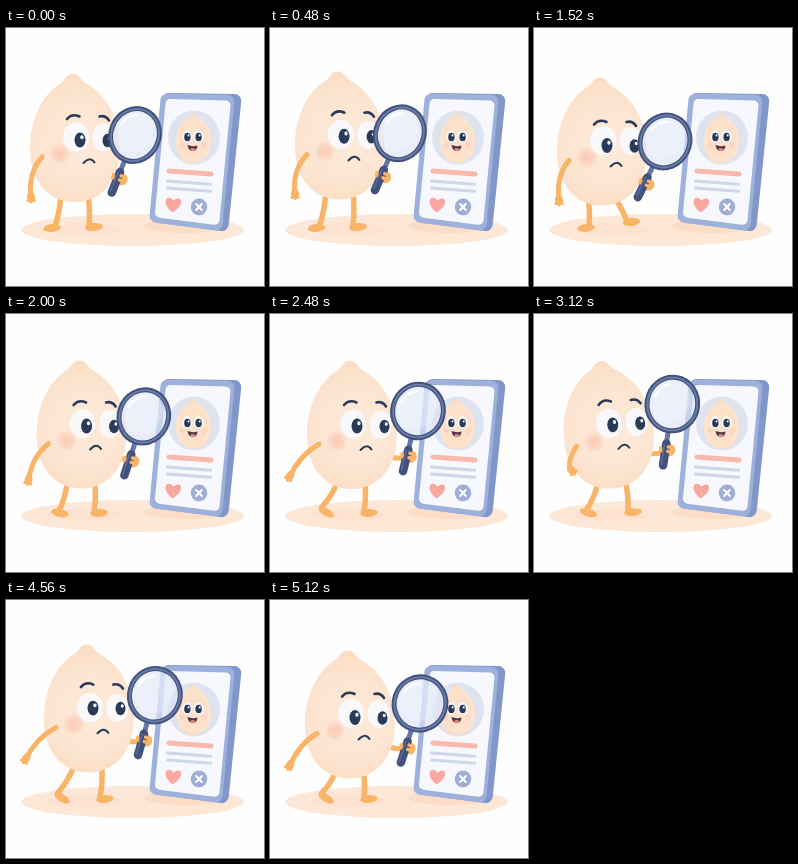
An HTML page with a canvas that plays this animation: 258x258 px, repeating every 5.2 s.

```html
<!DOCTYPE html>
<html lang="en">
<head>
<meta charset="utf-8">
<title>Curious seed</title>
<style>
html, body { margin: 0; width: 100%; height: 100%; overflow: hidden; background: #fefefe; }
canvas { display: block; width: 100vw; height: 100vh; }
</style>
</head>
<body>
<canvas id="stage"></canvas>
<script>
const SIZE = 258, LOOP = 5200, STEP = 80;
const canvas = document.getElementById('stage');
const c = canvas.getContext('2d');
const ORANGE = '#f9b467', NAVY = '#42527c', INK = '#2a3b57';

function ramp(t, from, to) {
  const u = Math.min(1, Math.max(0, (t - from) / (to - from)));
  return u * u * (3 - 2 * u);
}

function pulse(t, mid, half) {
  return ramp(t, mid - half, mid) - ramp(t, mid, mid + half);
}

// The seed steps up, leans in, ponders, then leans in again
function poseAt(t) {
  const ponderIn = ramp(t, 2840, 3500), ponderOut = ramp(t, 4040, 4560);
  const think = ponderIn - ponderOut;
  const lean = ramp(t, 1600, 2440) - think;
  const step = ramp(t, 400, 880);
  const stride = pulse(t, 1520, 480);
  const crouch = stride + pulse(t, 5120, 440);
  const hop = pulse(t, 600, 480) + pulse(t, 4640, 360);
  const swing = pulse(t, 2840, 360);
  return {
    body: {
      x: 69 + step + 12 * lean - 8 * think - 2 * crouch + hop,
      y: 112 + lean + 3.5 * crouch - 3 * hop,
      tilt: -11 * think
    },
    gaze: { x: 4 - think - hop, y: 3 - lean + 2 * crouch - 2 * think - 1.5 * hop },
    lens: {
      x: 129 + 19 * lean - 6 * think + 2 * crouch + hop,
      y: 107 - 10 * lean - 28 * think + 6.5 * crouch - 2 * hop,
      r: 26.2 + 1.3 * (lean + think) + crouch * 0.5,
      tilt: 22 - 8 * lean - 22 * think + 4 * crouch + 2 * hop
    },
    elbow: { x: 22 + 8 * lean + 13 * think - 2 * swing, y: 145 - 4 * lean + 18 * think + 2 * crouch - 3 * hop },
    hand: { x: 25 - 5 * lean + 42 * think - 4 * swing, y: 169 - 7 * lean - 22 * think + 3 * crouch - 4 * hop },
    left: { x: 46 + 6 * step + 4 * lean, y: 200 - 2 * lean, tilt: 0.65 * lean, heel: 3 - 7 * lean },
    right: { x: 88 + 11 * (lean + think) + 9.5 * stride, y: 199 - 2 * think - 5 * stride, tilt: 0, heel: -5 }
  };
}

function oval(x, y, rx, ry, fill, rot = 0) {
  c.beginPath();
  c.ellipse(x, y, rx, ry, rot, 0, Math.PI * 2);
  c.fillStyle = fill;
  c.fill();
}

function ring(rx, ry, width, color, from = 0, to = Math.PI * 2) {
  c.beginPath();
  c.ellipse(0, 0, rx, ry, 0, from, to);
  c.lineWidth = width;
  c.strokeStyle = color;
  c.stroke();
}

// Stroke between two points; an optional control point bends it
function line(x1, y1, x2, y2, width, color, cx = (x1 + x2) / 2, cy = (y1 + y2) / 2) {
  c.beginPath();
  c.moveTo(x1, y1);
  c.quadraticCurveTo(cx, cy, x2, y2);
  c.lineWidth = width;
  c.strokeStyle = color;
  c.stroke();
}

// Filled quad with rounded corners
function quad(points, radius, fill) {
  const n = points.length, last = points[n - 1], first = points[0];
  c.beginPath();
  c.moveTo((last[0] + first[0]) / 2, (last[1] + first[1]) / 2);
  points.forEach((p, i) => c.arcTo(...p, ...points[(i + 1) % n], radius));
  c.closePath();
  c.fillStyle = fill;
  c.fill();
}

function glow(x, y, r, alpha) {
  const g = c.createRadialGradient(x, y, 0, x, y, r);
  g.addColorStop(0, `rgba(250,180,158,${alpha})`);
  g.addColorStop(0.5, `rgba(250,180,158,${alpha * 0.7})`);
  g.addColorStop(1, 'rgba(250,180,158,0)');
  oval(x, y, r, r, g);
}

function seed() {
  c.beginPath();
  c.moveTo(-2, -66);
  c.bezierCurveTo(-9, -66, -9, -61, -14, -57);
  c.bezierCurveTo(-35, -44, -45, -18, -45, 8);
  c.bezierCurveTo(-45, 40, -28, 62, 0, 62);
  c.bezierCurveTo(28, 62, 45, 38, 45, 8);
  c.bezierCurveTo(45, -22, 31, -46, 10, -57);
  c.bezierCurveTo(5, -61, 4, -66, -2, -66);
  const g = c.createRadialGradient(8, 4, 12, 0, 0, 68);
  g.addColorStop(0, '#fde9d8');
  g.addColorStop(0.6, '#fce4d0');
  g.addColorStop(1, '#fbdcc2');
  c.fillStyle = g;
  c.fill();
}

function eye(x, y, rx, ry, px, py, size) {
  oval(x, y, rx, ry, '#f9f9fb');
  oval(x + px, y + py, size, size * 1.35, INK);
  oval(x + px + size * 0.35, y + py - size * 0.5, size * 0.3, size * 0.35, '#fff');
}

function ground() {
  oval(126.5, 202, 111.5, 16, '#fde8d8');
  oval(78, 201, 38, 6, '#fce2cf');
  oval(180, 198, 42, 7, '#fbddc8');
}

function avatar() {
  oval(188, 109.5, 26, 27, '#dfe2ef');
  c.save();
  c.translate(187.5, 111);
  c.scale(0.39, 0.39);
  seed();
  c.restore();
  oval(187.5, 111, 15, 18, 'rgba(251,216,184,.4)');
  for (const side of [-1, 1]) {
    glow(187 + side * 11, 117, 3.5, 0.35);
    eye(187 + side * 5.6, 108.5, 5, 6, 0, 0.5, 3.2);
  }
  c.beginPath();
  c.moveTo(181.5, 117);
  c.quadraticCurveTo(186.5, 119, 191.5, 117.5);
  c.quadraticCurveTo(191, 123, 186.5, 123);
  c.quadraticCurveTo(182, 122.5, 181.5, 117);
  c.fillStyle = '#55384a';
  c.fill();
  oval(186.8, 121.5, 2.6, 1.3, '#f0948a');
}

function phone() {
  quad([[156, 65], [236, 66], [222, 204], [145, 194]], 7, '#8197ca');
  quad([[155, 65.5], [229, 67], [216, 203], [143, 194]], 7, '#9db1dc');
  quad([[160, 71], [225, 72.5], [213, 197.5], [148.5, 189]], 5, '#f6f8fd');
  avatar();
  line(163, 143, 205, 146, 5, '#fbb9ae');
  for (const y of [153, 160]) line(161.5, y, 204.5, y + 3.3, 3, '#ced6ea');
  c.beginPath();
  c.moveTo(166.5, 184.5);
  c.bezierCurveTo(154, 175, 161, 165, 167.5, 172.5);
  c.bezierCurveTo(175, 166, 180.5, 176, 166.5, 184.5);
  c.fillStyle = '#f9a8a0';
  c.fill();
  oval(193, 179, 8.2, 8.5, '#a0aed5');
  line(190.2, 176, 195.8, 182, 2, '#fff');
  line(195.8, 176, 190.2, 182, 2, '#fff');
}

function face(gaze) {
  const lift = 3 - gaze.y;
  glow(-15, 14, 11, 0.55);
  eye(1, -3, 13, 14.5, gaze.x, gaze.y, 5.5);
  eye(28.5, -2.5, 11, 14, gaze.x, gaze.y, 5);
  line(-8, -21 - lift, 4.5, -23.5 - lift, 2.6, INK, -3, -27 - lift);
  line(24.5, -23.5 - lift, 34, -19.5 - lift, 2.6, INK, 30.5, -25 - lift);
  line(8.5, 23, 19.5, 22.5, 2, INK, 15, 16);
}

// Stage point at an offset inside a tilted part
function placed(part, dx, dy) {
  const a = part.tilt * Math.PI / 180;
  return [part.x + dx * Math.cos(a) - dy * Math.sin(a), part.y + dx * Math.sin(a) + dy * Math.cos(a)];
}

function inside(part, paint) {
  c.save();
  c.translate(part.x, part.y);
  c.rotate(part.tilt * Math.PI / 180);
  paint();
  c.restore();
}

function leg(body, hip, foot) {
  const [x, y] = placed(body, hip, 54);
  const ax = foot.x + foot.heel, ay = foot.y - 2 - 5 * foot.tilt;
  line(x, y, ax, ay, 5.5, ORANGE, (x + ax) / 2 + 2, (y + ay) / 2 + 2);
  oval(foot.x, foot.y, 8.8, 3.9, ORANGE, foot.tilt - 0.1);
}

function nearArm(body, elbow, hand) {
  const [sx, sy] = placed(body, -33, 17);
  line(sx, sy, hand.x, hand.y, 5, ORANGE, elbow.x, elbow.y);
  const a = Math.atan2(hand.y - elbow.y, hand.x - elbow.x);
  oval(hand.x, hand.y, 5.5, 4, ORANGE, a);
  for (const turn of [-0.6, 0.1, 0.8]) {
    line(hand.x, hand.y, hand.x + Math.cos(a + turn) * 5, hand.y + Math.sin(a + turn) * 5, 2.8, ORANGE);
  }
}

function farArm(body, lens) {
  const [sx, sy] = placed(body, 37, 30);
  const [hx, hy] = placed(lens, 3, 47);
  line(sx, sy, hx, hy, 5, ORANGE, (sx + hx) / 2, (sy + hy) / 2 + 2);
}

function magnifier(r) {
  const tall = 29;
  oval(4.5, 46, 5.5, 6, ORANGE);
  line(0, tall, 0, tall + 8, 5, '#6577a8');
  line(0, 40, 0, 62, 8.5, NAVY);
  line(-1.8, 41, -1.8, 61, 1.6, '#596b96');
  oval(0, 0, r - 2, tall - 2, 'rgba(221,229,248,.64)');
  oval(-2, -2, r - 8, tall - 8, 'rgba(240,244,254,.3)', 0.3);
  ring(r - 2.2, tall - 2.2, 5, NAVY);
  ring(r - 2.6, tall - 2.6, 1.8, '#6b7dab');
  ring(r - 9, tall - 9, 2.5, 'rgba(255,255,255,.85)', Math.PI * 1.08, Math.PI * 1.4);

  // Fingers wrapped round the handle
  for (const y of [43, 47.5]) line(2.5, y, 7, y, 3.5, ORANGE);
  line(-5, 45, -4.5, 48, 3.5, ORANGE);
}

function draw(t) {
  const { body, gaze, lens, elbow, hand, left, right } = poseAt(t);
  c.fillStyle = '#fefefe';
  c.fillRect(0, 0, SIZE, SIZE);
  ground();
  phone();
  leg(body, -14, left);
  leg(body, 13, right);
  farArm(body, lens);
  inside(body, () => { seed(); face(gaze); });
  nearArm(body, elbow, hand);
  inside(lens, () => magnifier(lens.r));
}

const ratio = window.devicePixelRatio || 1;
canvas.width = canvas.height = Math.round(SIZE * ratio);
c.scale(canvas.width / SIZE, canvas.height / SIZE);
c.lineCap = 'round';
c.lineJoin = 'round';

function tick() {
  const t = performance.now() % LOOP;
  draw(Math.floor(t / STEP) * STEP);
  requestAnimationFrame(tick);
}
tick();
</script>
</body>
</html>
```
